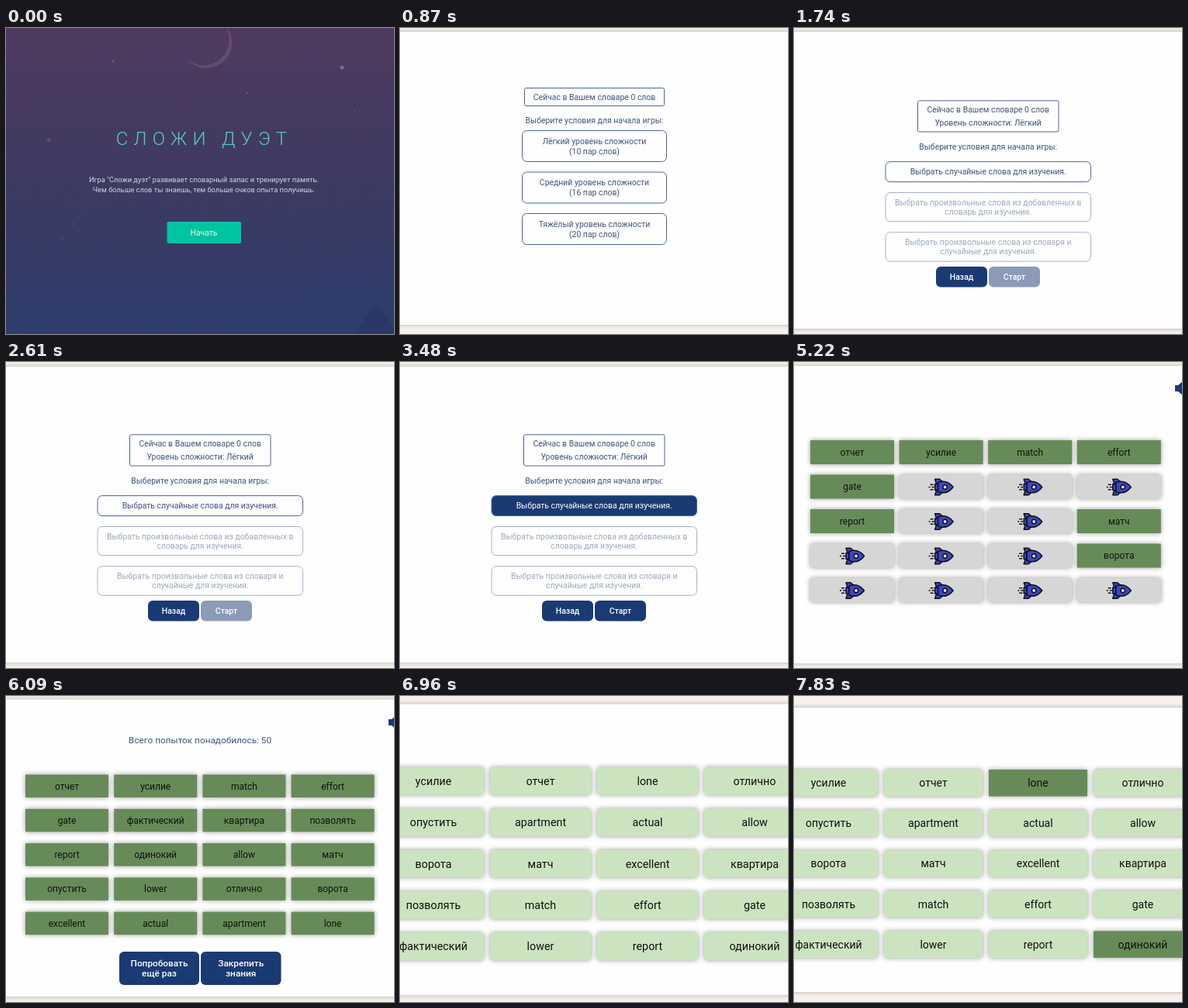
Write an HTML page that moves like this. It is 500x395 px and loops after 8000 ms.

```html
<!DOCTYPE html>
<html lang="ru">
<head>
<meta charset="utf-8">
<style>
  html, body { margin: 0; width: 100%; height: 100%; overflow: hidden; background: #f6f1ed; }
  svg { display: block; width: 500px; height: 395px; }
  text { font-family: Roboto, sans-serif; text-anchor: middle; }
  .panel { filter: drop-shadow(0 0 3px #0004); }
  .cards rect { filter: drop-shadow(0 0 3px #0006); }
</style>
</head>
<body>
<svg id="stage" viewBox="0 0 500 395"></svg>
<script>
const LOOP = 8000, STEP = 870;
const NAVY = '#1a3a73', INK = '#3d5482', LINE = '#4a6499', GREEN = '#678b58', MINT = '#cbe4bf';
const BODY = 10.43;

const text = (x, y, str, size = BODY, fill = INK, extra = '') =>
  `<text x="${x}" y="${y + size * .355}" font-size="${size}" fill="${fill}" ${extra}>${str}</text>`;

const rect = (x, y, w, h, r, fill, extra = '') =>
  `<rect x="${x}" y="${y}" width="${w}" height="${h}" rx="${r}" fill="${fill}" ${extra}/>`;

const dot = (x, y, r, opacity) =>
  `<circle cx="${x}" cy="${y}" r="${r}" fill="#b79bb4" opacity="${opacity}"/>`;

const panel = (top, bottom) =>
  rect(-20, top, 540, bottom - top, 0, '#fefefe', 'class="panel"');

const outline = (x, y, w, h, r, active) =>
  rect(x, y, w, h, r, active ? NAVY : 'none', `stroke="${LINE}"`);

const lines = (x, y, gap, rows, size, fill, extra) =>
  rows.map((row, i) => text(x, y + (i - (rows.length - 1) / 2) * gap, row, size, fill, extra)).join('');

const button = (x, y, w, h, rows, size = BODY, opacity = 1) =>
  `<g opacity="${opacity}">` + rect(x, y, w, h, 6, NAVY) +
  lines(x + w / 2, y + h / 2, size * 1.1, rows, size, '#fff', 'font-weight="500"') + '</g>';

const speaker = x =>
  `<path d="M${x} 30h4l6-5v18l-6-5h-4z" fill="${NAVY}"/>`;

const rocket = (x, y) => `<g transform="translate(${x} ${y})" stroke="#111" stroke-width="1.5" stroke-linejoin="round" fill="#3d45c4">
  <path d="M3-6L-2-10.3H-8L-6-4zM3 6L-2 10.3H-8L-6 4z"/>
  <path d="M-8-4H-4V4H-8z"/>
  <path d="M-4-6C4-9 11-6 15.5 0C11 6 4 9-4 6z"/>
  <circle cx="5" r="2.7" fill="#ddd"/>
  <path d="M-16 0h2m2 0h3M-14-3.3h4M-14 3.3h4"/></g>`;

// Lays out 4 x 5 cards; face(i) gives the look of each one.
function cards({ x, y, dx, dy, w, h, size }, face) {
  let boxes = '', labels = '';
  for (let i = 0; i < 20; i++) {
    const left = x + i % 4 * dx, top = y + Math.floor(i / 4) * dy;
    const { fill, r, word } = face(i);
    boxes += rect(left, top, w, h, r, fill);
    labels += word ? text(left + w / 2, top + h / 2, word, size, '#111')
                   : rocket(left + w / 2, top + h / 2 + .5);
  }
  return `<g class="cards">${boxes}</g>${labels}`;
}

const gameWords = ('отчет усилие match effort gate фактический квартира позволять report одинокий ' +
  'allow матч опустить lower отлично ворота excellent actual apartment lone').split(' ');
const drillWords = ('усилие отчет lone отлично опустить apartment actual allow ворота матч ' +
  'excellent квартира позволять match effort gate фактический lower report одинокий').split(' ');

function intro() {
  return `<defs><linearGradient id="sky" x2="0" y2="1">
      <stop stop-color="#503a5f"/><stop offset=".5" stop-color="#3d3a62"/><stop offset="1" stop-color="#2d3d6c"/>
    </linearGradient></defs>` +
    rect(0, 0, 500, 395, 0, 'url(#sky)') +
    '<path d="M279-7A33.1 33.1 0 1 1 232 39A32.9 32.9 0 0 0 279-7z" fill="#654c6d"/>' +
    '<path d="M285 395L446 313L500 350V395z" fill="#2c3e70" opacity=".3"/>' +
    '<path d="M477 353L449 395H505z" fill="#2b3766"/>' +
    dot(433, 51, 2.5, .5) + dot(138, 43, 1.6, .3) + dot(310.5, 84, 1.6, .25) + dot(55, 145, 2.6, .2) +
    dot(449, 108, 1, .3) + dot(308, 110, 1, .2) + dot(87, 253, 1.2, .2) + dot(73, 272, 1, .2) +
    text(255.5, 142.5, 'СЛОЖИ ДУЭТ', 24, '#55cabf', 'font-weight="300" letter-spacing="7.3"') +
    lines(255, 202.5, 13, ['Игра "Сложи дуэт" развивает словарный запас и тренирует память.',
      'Чем больше слов ты знаешь, тем больше очков опыта получишь.'], 9.27, '#d5d3df') +
    rect(207.5, 250, 95.5, 28, 2, '#00c49f') + text(255, 264, 'Начать', BODY, '#e4f8f3');
}

function levels() {
  const level = (y, name, pairs) => outline(157.5, y, 186, 40, 6) +
    lines(250.5, y + 20, 13, [name + ' уровень сложности', `(${pairs} пар слов)`]);
  return panel(5, 383) + outline(160.5, 77.5, 180, 23, 2) +
    text(250.5, 89, 'Сейчас в Вашем словаре 0 слов') +
    text(250.5, 119.5, 'Выберите условия для начала игры:') +
    level(132.5, 'Лёгкий', 10) + level(186, 'Средний', 16) + level(239.5, 'Тяжёлый', 20);
}

function options(top, chosen) {
  return panel(top, 388) + outline(159.5, 93.8, 181.5, 40.2, 2) +
    lines(250.2, 114, 16.5, ['Сейчас в Вашем словаре 0 слов', 'Уровень сложности: Лёгкий']) +
    text(250.2, 153.3, 'Выберите условия для начала игры:') +
    outline(118, 172.6, 264.5, 26, 6, chosen) +
    text(250.2, 185.5, 'Выбрать случайные слова для изучения.', BODY, chosen ? '#fff' : INK) +
    '<g opacity=".5">' + outline(118, 212.5, 264.5, 37.2, 6) + outline(118, 263.7, 264.5, 37.5, 6) +
    lines(250.2, 231, 12.2, ['Выбрать произвольные слова из добавленных в', 'словарь для изучения.']) +
    lines(250.2, 282.3, 12.2, ['Выбрать произвольные слова из словаря и', 'случайные для изучения.']) + '</g>' +
    button(183, 308, 66, 26.5, ['Назад']) + button(251, 308, 66, 26.5, ['Старт'], BODY, chosen ? 1 : .5);
}

function game(solved) {
  const grid = { x: 21, y: 101, dx: 114.6, dy: 44.5, w: 108, h: 31, size: 12 };
  return panel(5, 389) + speaker(491) + cards(grid, i => solved.includes(i)
    ? { fill: GREEN, r: 0, word: gameWords[i] } : { fill: '#d6d6d6', r: 3 });
}

function result() {
  const grid = { x: 25, y: 101.5, dx: 114.2, dy: 44.3, w: 107, h: 29.5, size: 12 };
  return panel(4.5, 388) + speaker(493) +
    text(250, 56.5, 'Всего попыток понадобилось: 50', 11.8) +
    cards(grid, i => ({ fill: GREEN, r: 0, word: gameWords[i] })) +
    button(146, 330, 103, 43, ['Попробовать', 'ещё раз'], 11.8) +
    button(251, 330, 103.5, 43, ['Закрепить', 'знания'], 11.8);
}

const drill = (top, bottom, grid, picked) => panel(top, bottom) + cards(grid, i =>
  ({ fill: picked.includes(i) ? GREEN : MINT, r: picked.includes(i) ? 0 : 4, word: drillWords[i] }));

const scenes = [
  intro(), levels(), options(5, false), options(6, false), options(6, true),
  game([]), game([0, 8, 1, 3, 2, 11, 4, 15]), result(),
  drill(10.5, 386, { x: -22, y: 92, dx: 138, dy: 53.4, w: 130, h: 35.5, size: 14.3 }, []),
  drill(15, 382, { x: -19, y: 95, dx: 135, dy: 52.1, w: 127, h: 34.5, size: 14 }, [2, 19])
];

const stage = document.getElementById('stage');
const start = performance.now();
let shown = -1;

function draw() {
  const index = Math.floor((performance.now() - start) % LOOP / STEP);
  if (index !== shown) stage.innerHTML = scenes[shown = index];
  requestAnimationFrame(draw);
}
draw();
</script>
</body>
</html>
```
